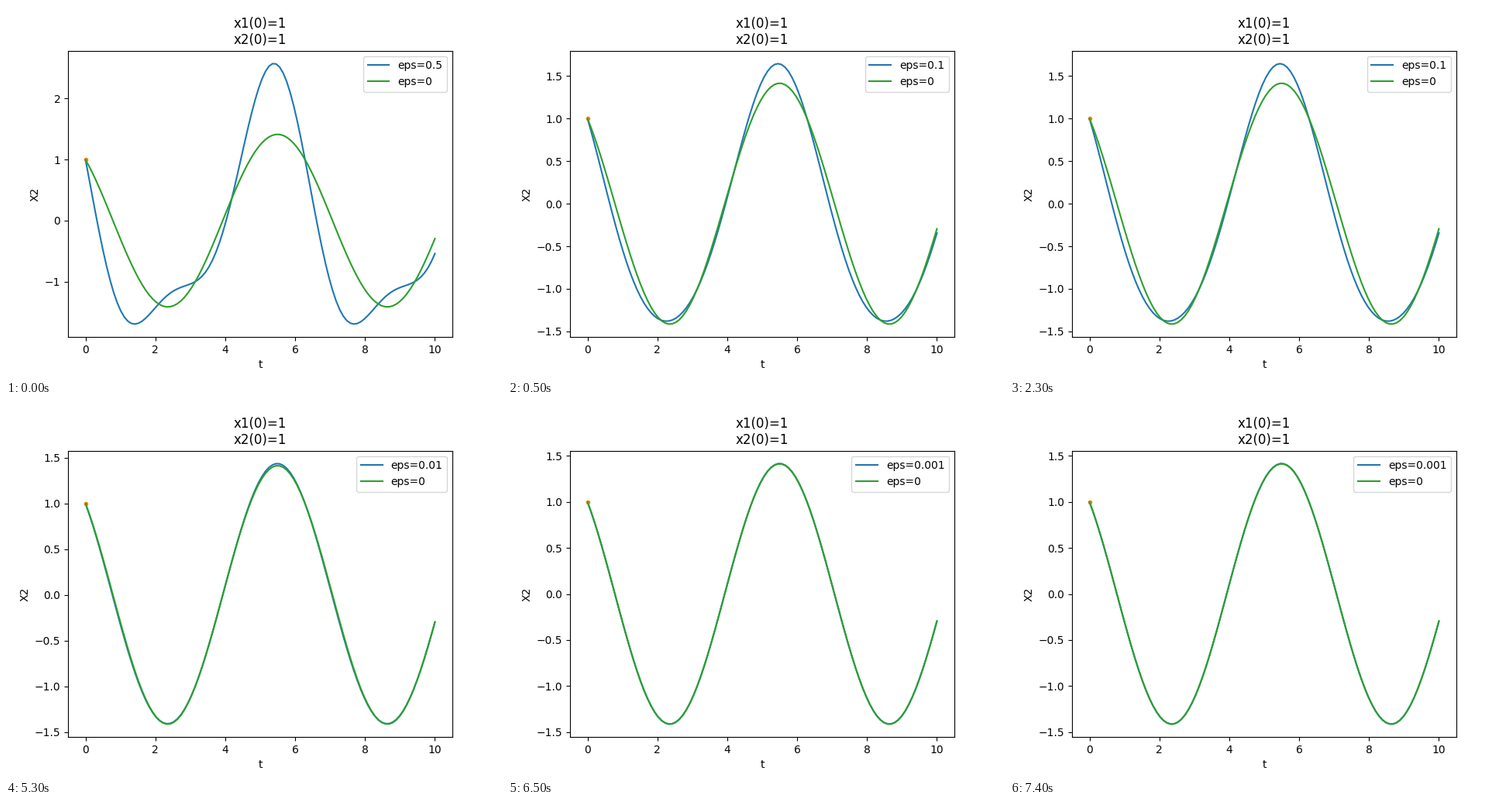
A matplotlib script for the animation above (8 s loop, 640 by 480 pixels).

```python
import numpy as np
import matplotlib.pyplot as plt
from matplotlib.animation import FuncAnimation

STEP_MS = 500
# (eps, number of steps it stays on screen)
STAGES = [(0.5, 1), (0.1, 6), (0.01, 6), (0.001, 3)]
SCHEDULE = [eps for eps, steps in STAGES for _ in range(steps)]

t = np.linspace(0, 10, 100)


def x2(eps):
    """Harmonic solution plus its first-order correction in eps."""
    return np.cos(t) - np.sin(t) - 4 / 3 * eps * (np.sin(t) + np.sin(2 * t))


fig, ax = plt.subplots(figsize=(6.4, 4.8), dpi=100)


def draw(i):
    eps = SCHEDULE[i % len(SCHEDULE)]
    ax.clear()
    ax.plot(t, x2(eps), color="C0", label=f"eps={eps}")
    ax.plot(0, 1, ".", color="C1")
    ax.plot(t, x2(0), color="C2", label="eps=0")
    ax.set_title("x1(0)=1\nx2(0)=1")
    ax.set_xlabel("t")
    ax.set_ylabel("X2")
    ax.legend(loc="upper right")
    return ax.get_children()


anim = FuncAnimation(fig, draw, frames=len(SCHEDULE), init_func=lambda: draw(0),
                     interval=STEP_MS, repeat=True, repeat_delay=0, blit=False)
plt.show()
```
